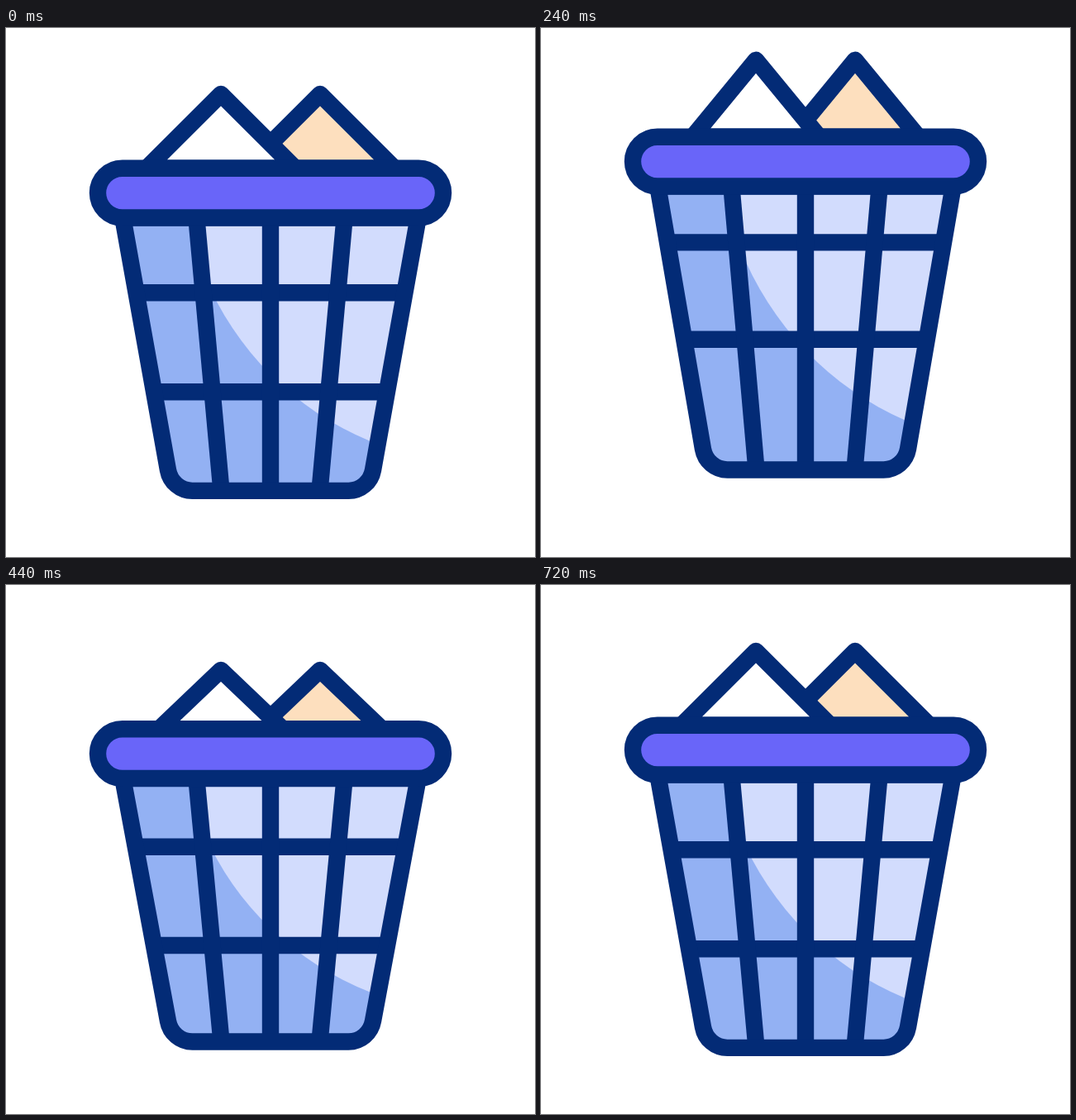
Animation, 640 px wide and 640 px high, one loop 1480 ms. Source, as an HTML page with a canvas:

```html
<!DOCTYPE html>
<html lang="en">
<head>
<meta charset="utf-8">
<title>Basket</title>
<style>
  html, body { margin: 0; width: 100%; height: 100%; overflow: hidden; background: #fff; }
  canvas { display: block; width: 640px; height: 640px; }
</style>
</head>
<body>
<canvas id="stage" width="640" height="640"></canvas>
<script>
const ctx = document.getElementById('stage').getContext('2d');
const LOOP = 1480, TICK = 40;
const INK = '#032b76', LIGHT = '#d2dcfd', SHADE = '#93b1f3',
      RIM = '#6965f9', PEACH = '#fddfbe';

// Eased progress from time a to time b
function ease(t, a, b) {
  const x = Math.min(1, Math.max(0, (t - a) / (b - a)));
  return x * x * (3 - 2 * x);
}

function pose(t) {
  const rise = ease(t, 80, 280), fall = ease(t, 280, 520), settle = ease(t, 520, 720);
  const lift = rise - fall;
  const sag = start => 20 * (ease(t, start, 480) - ease(t, 480, 720));
  return {
    peak: 80 - 46 * rise + 93 * fall - 47 * settle,
    half: 90 - 15 * (rise - settle),
    rim: 199.6 - 42.4 * lift + sag(350),
    bars: [320.2 - 67.9 * lift + sag(368), 440.3 - 71 * lift + sag(368)],
    base: 559.9 - 28.4 * lift
  };
}

function paint(fill) {
  if (fill) {
    ctx.fillStyle = fill;
    ctx.fill();
  }
  ctx.stroke();
}

function line(x1, y1, x2, y2) {
  ctx.beginPath();
  ctx.moveTo(x1, y1);
  ctx.lineTo(x2, y2);
  ctx.stroke();
}

function paper(x, p, fill) {
  const y = p.rim - 29.8;
  ctx.beginPath();
  ctx.moveTo(x, p.peak);
  ctx.lineTo(x + p.half, y);
  ctx.lineTo(x - p.half, y);
  ctx.closePath();
  paint(fill);
}

function bodyPath(top, base) {
  ctx.beginPath();
  ctx.moveTo(141.3, top);
  ctx.lineTo(196, base - 25);
  ctx.bezierCurveTo(198.6, base - 10.5, 211, base, 225.5, base);
  ctx.lineTo(414.5, base);
  ctx.bezierCurveTo(429, base, 441.4, base - 10.5, 444, base - 25);
  ctx.lineTo(498.7, top);
  ctx.closePath();
}

function body(p) {
  const top = p.rim + 30, base = p.base;
  bodyPath(top, base);
  ctx.fillStyle = SHADE;
  ctx.fill();

  // The lit area is an ellipse that stretches with the basket
  const s = (base - 60 - top) / 270.3;
  ctx.save();
  ctx.clip();
  ctx.beginPath();
  ctx.ellipse(582, top - 71.6 * s, 370, 370 * s, 0, 0, 2 * Math.PI);
  ctx.fillStyle = LIGHT;
  ctx.fill();
  ctx.restore();

  for (const y of p.bars) {
    const x = 141.3 + 54.7 * (y - top) / (base - 25 - top);
    line(x, y, 640 - x, y);
  }
  line(230.4, top, 260.5, base);
  line(320, top, 320, base);
  line(409.6, top, 379.5, base);
  bodyPath(top, base);
  paint();
}

function rim(y) {
  ctx.beginPath();
  ctx.roundRect(111, y - 29.8, 418, 59.6, 29.8);
  paint(RIM);
}

function draw(t) {
  const p = pose(t);
  ctx.fillStyle = '#fff';
  ctx.fillRect(0, 0, 640, 640);
  ctx.strokeStyle = INK;
  ctx.lineWidth = 20.4;
  ctx.lineJoin = 'round';
  paper(380, p, PEACH);
  paper(260, p, '#fff');
  body(p);
  rim(p.rim);
}

const start = performance.now();
function frame() {
  const t = (performance.now() - start) % LOOP;
  draw(Math.floor(t / TICK) * TICK);
  requestAnimationFrame(frame);
}
frame();
</script>
</body>
</html>
```
